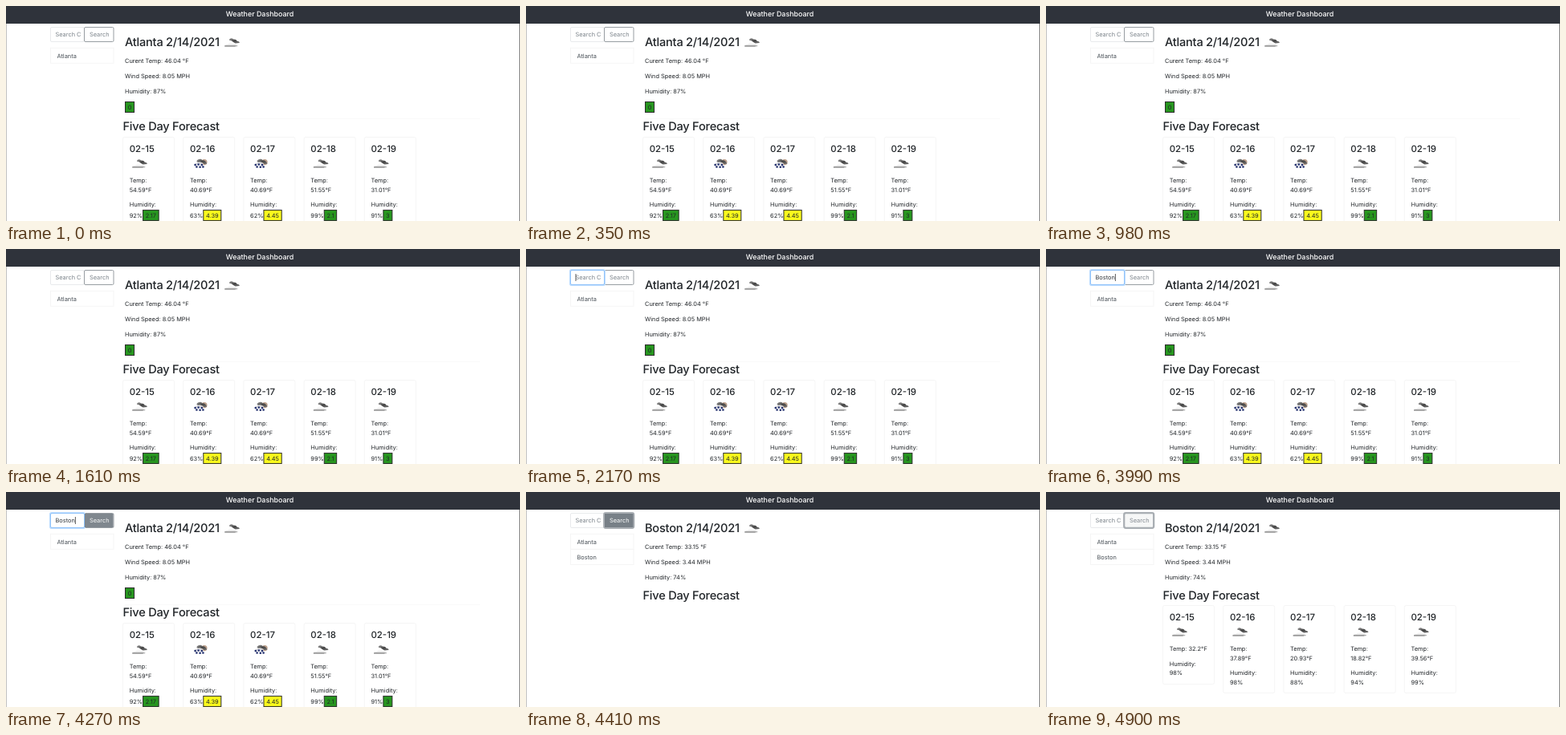
An HTML page that plays this animation: 640 by 268 pixels, repeating every 5.04 s.

```html
<!DOCTYPE html>
<html lang="en">
<head>
<meta charset="utf-8">
<title>Weather Dashboard</title>
<style>
  html, body { margin: 0; width: 100%; height: 100%; overflow: hidden; background: #fff; }
  svg { display: block; width: 100%; height: 100%; }
  text { font: 400 7.4px Inter, Roboto, sans-serif; fill: #212529; text-rendering: geometricPrecision; }
  .brand { font-size: 8.9px; font-weight: 500; fill: #fff; text-anchor: middle; }
  .heading { font-size: 14.6px; font-weight: 500; letter-spacing: -.016em; }
  .date { font-size: 11.4px; font-weight: 500; }
  .hint { fill: #7b838a; }
  .entry { fill: #343a40; }
  .item { fill: #495057; }
  .light { fill: #fff; }
  .frame { fill: none; stroke: #f5f5f5; }
  .badge { stroke: #2b2b2b; }
</style>
</head>
<body>
<svg id="stage" viewBox="0 0 640 268" preserveAspectRatio="none"></svg>
<script>
const LOOP = 5040, FADE = 150;
const FOCUS = 1960, HOVER = 4130, CLICK = 4340, FORECAST = 4550, LEAVE = 4760;
const CARD_STEP = 75.2;
const GREEN = '#27961f', YELLOW = '#fbfb1c';

const text = (x, y, s, cls = '') => `<text x="${x}" y="${y}" class="${cls}">${s}</text>`;
const rect = (x, y, w, h, attrs) => `<rect x="${x}" y="${y}" width="${w}" height="${h}" ${attrs}/>`;
const icon = (name, x, y) => `<use href="#${name}" x="${x}" y="${y}"/>`;
const during = (from, to, content) => `<g data-from="${from}" data-to="${to}">${content}</g>`;

// A label followed directly by its UV badge; both are laid out once measured.
const badge = (x, y, label, value, color) =>
  `<g class="uv">${text(x, y, label)}${rect(x, y - 9.2, 12, 13, `class="badge" fill="${color}"`)}${text(x, y, value)}</g>`;

const defs = `<defs>
  <linearGradient id="haze" x2="0" y2="1">
    <stop stop-color="#fff"/><stop offset=".6" stop-color="#ececec"/><stop offset="1" stop-color="#8a8a8a"/>
  </linearGradient>
  <linearGradient id="storm" x2="1" y2="1">
    <stop stop-color="#a0a0a0"/><stop offset=".5" stop-color="#444"/><stop offset="1" stop-color="#777"/>
  </linearGradient>
  <g id="cloud">
    <path d="M-3.5-3.6C-2.5-5.2 0-5 1.5-3.4C4-3.8 5.8-2.2 6-1.2C8-1.2 9.5 .3 9 1.1L4 1.4C2 .8 0-1-1.6-1.9C-3.4-2-4.4-2.8-3.5-3.6Z" fill="url(#storm)"/>
    <path d="M-9.5 4.9C-9.5 3.6-7 3-5.6 3.1C-5 .4-.5-.2 1 1.9C3.6 1.4 5.5 2.8 5.3 3.9C7 4 7.3 5 6 5.2H-9Z" fill="url(#haze)"/>
    <path d="M-9.5 5.1H4" stroke="#777" stroke-width=".8"/>
  </g>
  <g id="rain">
    <circle cx="5" cy="-1.4" r="3.6" fill="#bda08c"/>
    <path d="M-4.5-2.4C-3.5-5.6 .5-6.2 2.6-3.8C5-4.2 7.5-2 8.4.8L4.6 1C3-1 .6-1.6-1-1.4C-3-1-4.6-1.4-4.5-2.4Z" fill="url(#storm)"/>
    <path d="M-7 1.4C-6-.6-3.6-1.2-2-.6C0-2.2 3-1 4 1.4Z" fill="#d8d8dc"/>
    <path d="M-6.4 2h.2M-2.4 1.6h.2M1.8 2h.2M-4.6 4.6h.2M-.4 4.8h.2M3.4 4.4h.2" stroke="#26336f" stroke-width="2.5" stroke-linecap="round"/>
  </g>
</defs>`;

function summary(city, temp, wind, humidity) {
  return text(148, 50, `${city} 2/14/2021`, 'heading') + icon('cloud', 281.7, 45) +
    text(148, 70.7, `Curent Temp: ${temp} °F`) +
    text(148, 89.7, `Wind Speed: ${wind} MPH`) +
    text(148, 108.6, `Humidity: ${humidity}%`);
}

function cardFrame(i, y, height) {
  return rect(145.5 + i * CARD_STEP, y + .5, 64, height, 'class="frame" rx="2"');
}

function atlantaCard([temp, humidity, uv, color, sky], i) {
  const x = 153.7 + i * CARD_STEP;
  return cardFrame(i, 163, 120) +
    text(x, 181.5, `02-${15 + i}`, 'date') + icon(sky, x + 13, 196) +
    text(x, 220.2, 'Temp:') + text(x, 231.6, temp + '°F') +
    text(x, 250.2, 'Humidity:') + badge(x, 263.6, humidity + '%', uv, color);
}

function bostonCard([temp, humidity], i) {
  const x = 153.7 + i * CARD_STEP;
  const oneLine = temp.length < 5;
  const y = oneLine ? 217 : 228.3;
  return cardFrame(i, 141, oneLine ? 98 : 109) +
    text(x, 159.8, `02-${15 + i}`, 'date') + icon('cloud', x + 13, 174) +
    (oneLine ? text(x, 198.4, `Temp: ${temp}°F`)
             : text(x, 198.4, 'Temp:') + text(x, 209.8, temp + '°F')) +
    text(x, y, 'Humidity:') + text(x, y + 11.4, humidity + '%');
}

const atlanta = [
  ['54.59', 92, '2.17', GREEN, 'cloud'], ['40.69', 63, '4.39', YELLOW, 'rain'],
  ['40.69', 62, '4.45', YELLOW, 'rain'], ['51.55', 99, '2.1', GREEN, 'cloud'],
  ['31.01', 91, '3', GREEN, 'cloud']
].map(atlantaCard).join('');

const boston = [
  ['32.2', 98], ['37.89', 98], ['20.93', 88], ['18.82', 94], ['39.56', 99]
].map(bostonCard).join('');

const listItem = (y, city) => rect(55.5, y - 12.5, 78.5, 19, 'class="frame"') + text(63.5, y, city, 'item');

const search =
  rect(55.5, 26.5, 42, 18, 'fill="#fff" stroke="#e8eaec" rx="1.5"') +
  rect(97.5, 26.5, 36.5, 18, 'fill="#fff" stroke="#979da2" rx="1.5"') +
  text(104, 38.4, 'Search', 'hint') +
  `<g id="inputFocus">${rect(54.7, 25.7, 43.6, 19.6, 'fill="none" stroke="#bfdeff" stroke-width="1.6" rx="2"')}
   ${rect(55.5, 26.5, 42, 18, 'fill="none" stroke="#8fc2fa" rx="1.5"')}</g>` +
  during(CLICK, LOOP, rect(97.2, 26.2, 37, 18.6, 'fill="none" stroke="#a9aeb3" stroke-width="2.2" rx="2"')) +
  `<g id="buttonHover">${rect(98, 27, 35.5, 17, 'fill="#788087"')}${text(104, 38.4, 'Search', 'light')}</g>` +
  '<text id="entry" x="61.5" y="38.4"></text>' +
  rect(62, 31, .8, 9, 'id="caret" fill="#333"');

const stage = document.getElementById('stage');
stage.innerHTML = defs +
  rect(0, 0, 640, 268, 'fill="#fff"') +
  rect(0, 0, 640, 22, 'fill="#2f333b"') +
  text(316, 13.2, 'Weather Dashboard', 'brand') +
  rect(0, 22, .6, 246, 'fill="#999"') + rect(639, 22, 1, 246, 'fill="#888"') +
  search + listItem(64.8, 'Atlanta') +
  during(0, CLICK,
    summary('Atlanta', '46.04', '8.05', 87) + badge(148, 128.7, '', '0', GREEN) +
    rect(148, 140, 442, .7, 'fill="#f6f6f6"') +
    text(145.5, 155.4, 'Five Day Forecast', 'heading') + atlanta) +
  during(CLICK, LOOP,
    listItem(84, 'Boston') + summary('Boston', '33.15', '3.44', 74) +
    text(145.5, 133.7, 'Five Day Forecast', 'heading')) +
  during(FORECAST, LOOP, boston);

for (const g of stage.querySelectorAll('.uv')) {
  const [label, box, value] = g.children;
  const left = +label.getAttribute('x') + label.getComputedTextLength() + .5;
  box.setAttribute('x', left);
  box.setAttribute('width', value.getComputedTextLength() + 6.4);
  value.setAttribute('x', left + 3.2);
}

const [entry, caret, inputFocus, buttonHover] =
  ['entry', 'caret', 'inputFocus', 'buttonHover'].map(id => document.getElementById(id));
const timed = [...stage.querySelectorAll('[data-from]')];
const keyTimes = [2730, 2940, 3220, 3500, 3640, 3780];
const ramp = (t, start) => Math.min(1, Math.max(0, (t - start) / FADE));

function draw(t) {
  for (const g of timed) {
    g.style.display = t >= +g.dataset.from && t < +g.dataset.to ? '' : 'none';
  }
  const editing = t >= FOCUS && t < CLICK;
  const typed = editing ? 'Boston'.slice(0, keyTimes.filter(k => k <= t).length) : '';
  entry.textContent = typed || 'Search C';
  entry.setAttribute('class', typed ? 'entry' : 'hint');
  caret.setAttribute('x', 61.6 + (typed ? entry.getComputedTextLength() : 0));
  const blinkedOff = t > FOCUS + 500 && t < keyTimes[0];
  caret.style.display = editing && !blinkedOff ? '' : 'none';
  inputFocus.style.opacity = editing ? ramp(t, FOCUS) : 0;
  buttonHover.style.opacity = ramp(t, HOVER) - ramp(t, LEAVE);
}

const start = performance.now();
function tick() {
  draw((performance.now() - start) % LOOP);
  requestAnimationFrame(tick);
}
tick();
</script>
</body>
</html>
```
